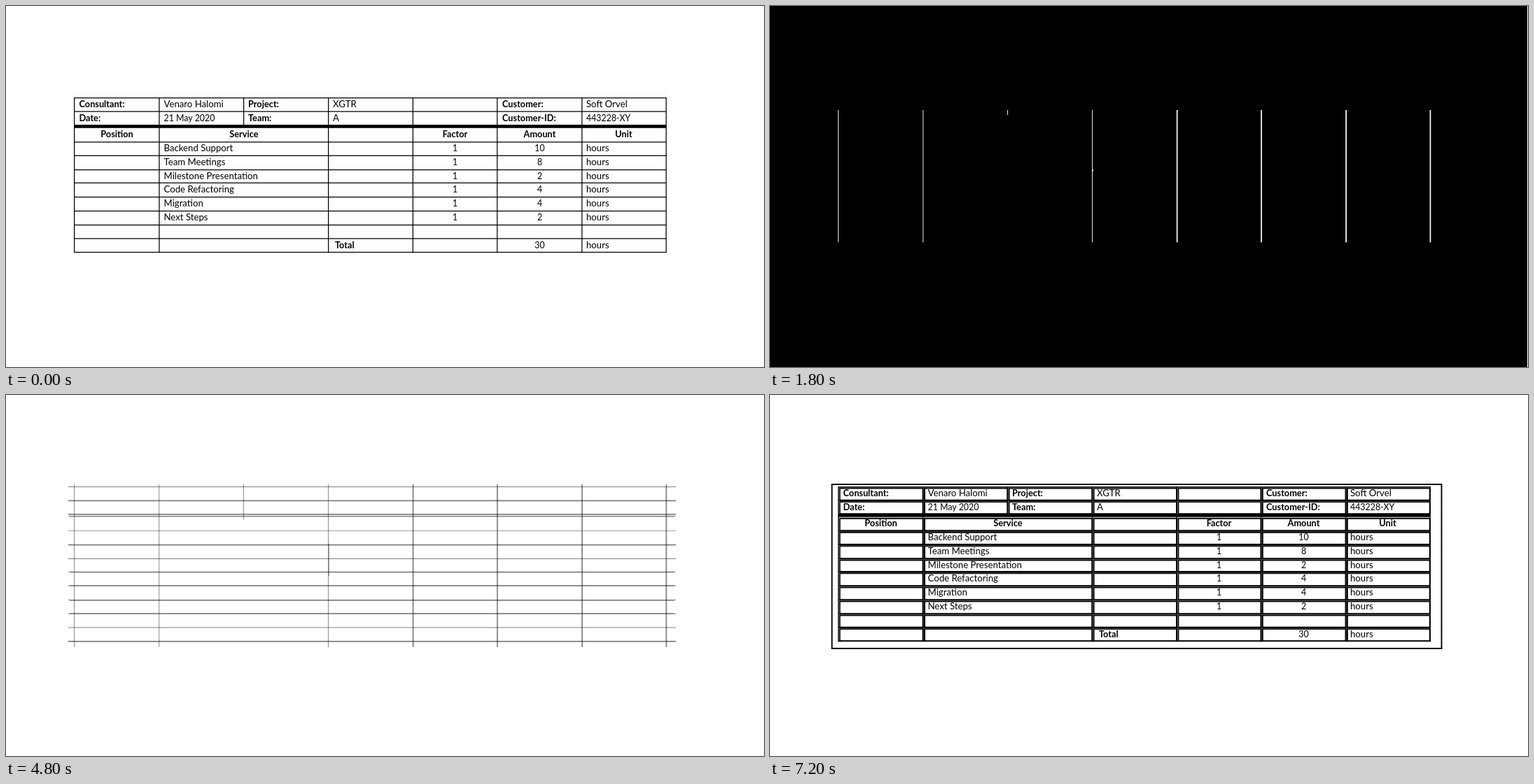
Recreate the animation shown at these times as an HTML page. Size 1083 by 517 pixels, loop 7.8 s.

```html
<!DOCTYPE html>
<html lang="en">
<head>
<meta charset="utf-8">
<title>Table line detection</title>
<style>
  html, body { margin: 0; width: 100%; height: 100%; overflow: hidden; background: #fff; }
  svg { display: block; width: 100%; height: 100%; }
  text { font: 13.2px Lato, "Open Sans", sans-serif; fill: currentColor; }
  .b { font-size: 12.75px; font-weight: 700; }
  .n { font-size: 12.4px; }
  .m { text-anchor: middle; }
</style>
</head>
<body>
<svg id="stage" viewBox="0 0 1083 517"></svg>
<script>
const STEP = 600;
const LEFT = 97, RIGHT = 943.9, TOP = 131, BOTTOM = 353.5;
const THIN = 1, THICK = 2, BROKEN = 3, ABOVE = 4;

// [position, kind]; broken lines lose their second pixel row at crossings
const rows = [[131, THIN], [150.6, THICK], [170.1, THICK], [172.9, BROKEN], [194.2, THIN],
  [213.8, THICK], [234, THIN], [252.8, BROKEN], [273, ABOVE], [293, BROKEN],
  [313, ABOVE], [332.6, THIN], [352, THICK]];
const cols = [[97, THIN], [218.3, BROKEN], [339, BROKEN], [460, BROKEN],
  [580.8, THICK], [701.2, THICK], [822.3, THICK], [942.6, THICK]];
const rowPos = rows.map(r => r[0]);
const colPos = cols.map(c => c[0]);
const SPLIT = colPos[2], MIDDLE = colPos[3];
const lowCols = colPos.filter(x => x !== SPLIT);

const box = (x, y, w, h) => `M${x} ${y}h${w}v${h}h${-w}z`;
const fill = (d, attrs = '') => `<path d="${d}" fill="currentColor" ${attrs}/>`;

// Morphology: trim at both ends, and the shortest run that survives
const RAW = { h: [0, 0, 0], v: [0, 0, 0] };
const ERODED = { h: [33, 30.4, 63.4], v: [18, 15, 33] };
const DILATED = { h: [-8, -13, 63.4], v: [-3, -7.4, 33] };

function strokes(lines, from, endOf, breaksOf, [start, end, min], grow, rect) {
  let d = '';
  const run = (pos, a, b, size) => {
    if (b - a > min) d += rect(pos, a + start, b - a - start - end + grow, size + grow);
  };
  for (const [pos, kind] of lines) {
    run(pos, from, endOf(pos), kind === THICK ? 1.7 : 0.9);
    if (kind < BROKEN) continue;
    const cuts = breaksOf(pos);
    const side = kind === ABOVE ? pos - 0.8 : pos + 0.8;
    for (let i = 1; i < cuts.length; i++) run(side, cuts[i - 1] + 2, cuts[i] - 1, 0.9);
  }
  return d;
}

const horizontal = (morph, grow = 0) => strokes(rows, LEFT, () => RIGHT, () => lowCols,
  morph.h, grow, (y, x, w, h) => box(x, y, w, h));

const vertical = (morph, grow = 0) => strokes(cols, TOP,
  x => x === SPLIT ? 171 : BOTTOM,
  x => x === SPLIT ? rowPos.slice(0, 3) : x === MIDDLE ? rowPos.filter(y => y !== 234) : rowPos,
  morph.v, grow, (x, y, h, w) => box(x, y, w, h));

const both = (morph, grow, opacity = 1) =>
  [horizontal(morph, grow), vertical(morph, grow)]
    .map(d => fill(d, `fill-opacity="${opacity}"`)).join('');

function tableLines() {
  let d = box(LEFT, 170, RIGHT - LEFT, 4.8);
  rowPos.forEach((y, i) => { if (i !== 2 && i !== 3) d += box(LEFT, y, RIGHT - LEFT, 1.25); });
  colPos.forEach(x => { d += box(x, TOP, 1.25, (x === SPLIT ? 171 : BOTTOM) - TOP); });
  return d;
}

function words() {
  const out = [];
  const put = (x, y, s, cls = '') =>
    out.push(`<text x="${x}" y="${y + 4.4}" class="${/^\d/.test(s) ? 'n ' : ''}${cls}">${s}</text>`);
  const left = [104.5, 225.5, 346, 467, 709, 829];
  const head = [
    ['Consultant:', 'Venaro Halomi', 'Project:', 'XGTR', 'Customer:', 'Soft Orvel'],
    ['Date:', '21 May 2020', 'Team:', 'A', 'Customer-ID:', '443228-XY']];
  head.forEach((line, r) => line.forEach((s, i) =>
    put(left[i], r ? 160.3 : 140.7, s, i % 2 ? '' : 'b')));

  [['Position', 158.5], ['Service', 340], ['Factor', 641.5], ['Amount', 762.5], ['Unit', 882.5]]
    .forEach(([s, x]) => put(x, 183.7, s, 'b m'));

  const items = [['Backend Support', 10, 204], ['Team Meetings', 8, 224],
    ['Milestone Presentation', 2, 243.6], ['Code Refactoring', 4, 262.8],
    ['Migration', 4, 282.5], ['Next Steps', 2, 303]];
  for (const [name, amount, y] of items) {
    put(225.5, y, name);
    put(641.5, y, '1', 'm');
    put(762.5, y, String(amount), 'm');
    put(829, y, 'hours');
  }
  put(470, 342.3, 'Total', 'b');
  put(762.5, 342.3, '30', 'm');
  put(829, 342.3, 'hours');
  return out.join('');
}

function cellBoxes() {
  let d = box(88.5, 128, 871, 235);
  for (let r = 1; r < rowPos.length; r++) {
    if (r === 3) continue;
    const y = rowPos[r - 1] + (r === 4 ? 3.9 : 2.5);
    const xs = r < 3 ? colPos : lowCols;
    for (let c = 1; c < xs.length; c++) {
      const x = xs[c - 1] + 2.6;
      d += box(x, y, xs[c] - x + 0.2, rowPos[r] - y + 0.1);
    }
  }
  return `<path d="${d}" fill="none" stroke="currentColor" stroke-width="1.9"/>`;
}

const text = words();
const table = fill(tableLines()) + text;
const binary = both(RAW, 0) + text;
const grid = both(DILATED, 0, 0.5);
const bold = both(DILATED, 1.1);
const edge = fill(box(1082, 0, 1, 517));

// [content, dark background]
const scenes = [
  [table],
  [binary],
  [binary, true],
  [fill(vertical(ERODED)), true],
  [fill(vertical(DILATED)), true],
  [fill(horizontal(ERODED)), true],
  [fill(horizontal(DILATED)), true],
  [grid, true],
  [grid],
  [both(DILATED, 1.1, 0.5)],
  [bold],
  [bold + `<g color="#fff">${fill(tableLines())}</g>` + text],
  [table + cellBoxes()]
];

const stage = document.getElementById('stage');
let shown = -1;

function draw(time) {
  const i = Math.floor(time / STEP) % scenes.length;
  if (i === shown) return;
  shown = i;
  const [content, dark] = scenes[i];
  stage.style.color = dark ? '#fff' : '#000';
  stage.style.background = dark ? '#000' : '#fff';
  stage.innerHTML = dark ? content + edge : content;
}

const begin = performance.now();
function tick() {
  draw(performance.now() - begin);
  requestAnimationFrame(tick);
}
tick();
</script>
</body>
</html>
```
